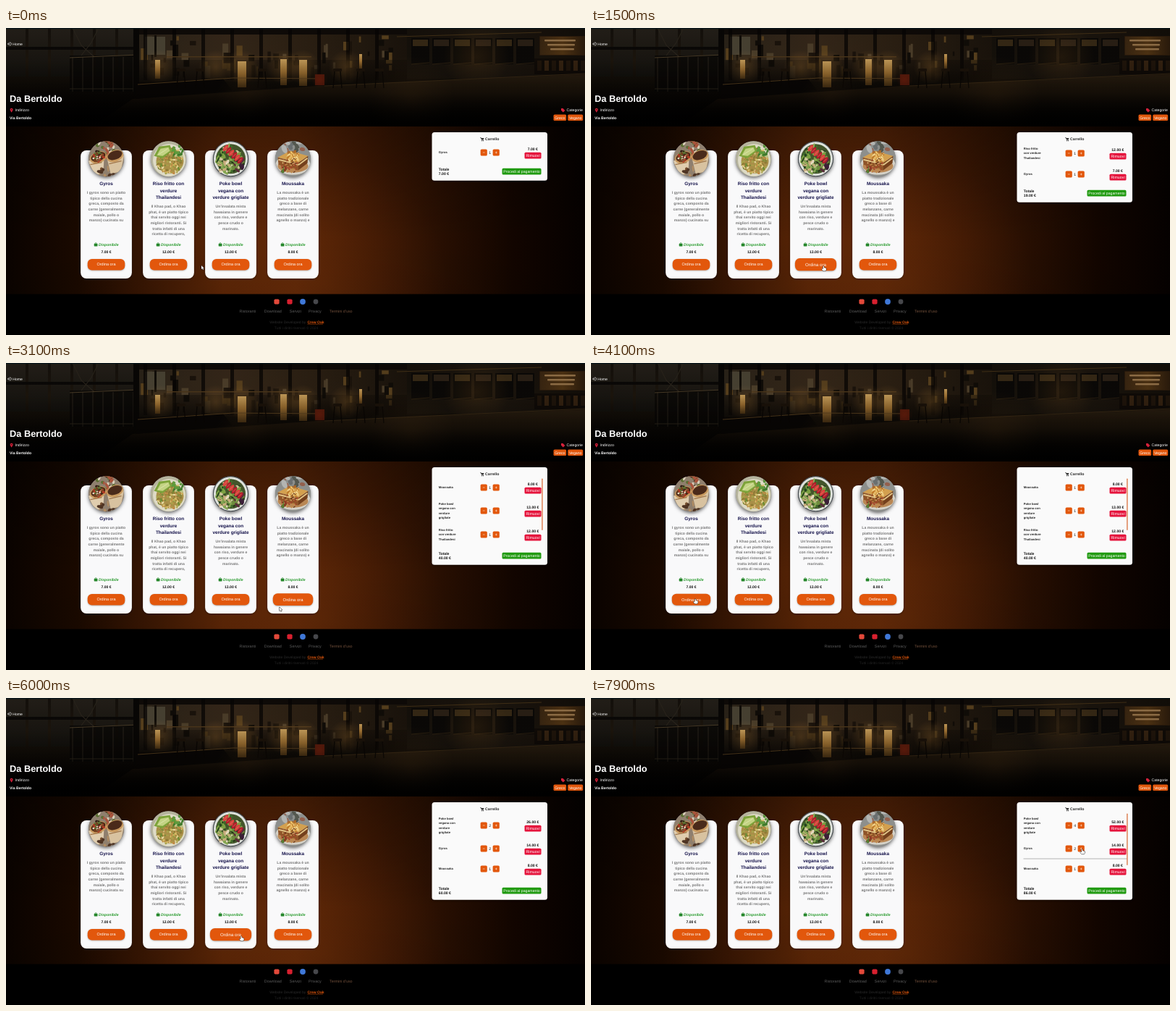
Write an HTML page with a canvas that moves like this. It is 800 px wide and 424 px high and loops after 8000 ms.

```html
<!DOCTYPE html>
<html lang="it">
<head>
<meta charset="utf-8">
<title>Menu</title>
<style>
html, body { margin: 0; width: 100%; height: 100%; overflow: hidden; background: #000; }
canvas { display: block; width: 800px; height: 424px; }
</style>
</head>
<body>
<canvas id="stage"></canvas>
<script>
const W = 800, H = 424, LOOP = 8000;
const ORANGE = '#e2570c', FONT = '"Liberation Sans", Arial, sans-serif';
const dpr = Math.max(1, window.devicePixelRatio || 1);

function setup(canvas) {
  canvas.width = W * dpr;
  canvas.height = H * dpr;
  const c = canvas.getContext('2d');
  c.scale(dpr, dpr);
  c.textBaseline = 'alphabetic';
  c.textRendering = 'geometricPrecision';
  return c;
}
const screen = setup(document.getElementById('stage'));
const page = document.createElement('canvas');
let g = setup(page);

// ---------- helpers ----------
function rect(x, y, w, h, fill, r = 0) {
  g.fillStyle = fill;
  g.beginPath();
  g.roundRect(x, y, w, h, r);
  g.fill();
}
function disc(x, y, r, fill) {
  g.fillStyle = fill;
  g.beginPath();
  g.arc(x, y, r, 0, 7);
  g.fill();
}
function oval(x, y, rx, ry, turn, fill) {
  g.fillStyle = fill;
  g.beginPath();
  g.ellipse(x, y, rx, ry, turn, 0, 7);
  g.fill();
}
function poly(fill, ...p) {
  g.fillStyle = fill;
  g.beginPath();
  for (let i = 0; i < p.length; i += 2) g.lineTo(p[i], p[i + 1]);
  g.fill();
}
function line(color, width, ...p) {
  g.strokeStyle = color;
  g.lineWidth = width;
  g.beginPath();
  for (let i = 0; i < p.length; i += 2) g.lineTo(p[i], p[i + 1]);
  g.stroke();
}
// y is the middle of the capitals
function text(s, x, y, size, color, weight = '', align = 'left') {
  g.font = `${weight} ${size}px ${FONT}`;
  g.textAlign = align;
  g.fillStyle = color;
  g.fillText(s, x, y + size * 0.36);
}
function shade(x0, y0, x1, y1, ...colors) {
  const s = g.createLinearGradient(x0, y0, x1, y1);
  colors.forEach((c, i) => s.addColorStop(i / (colors.length - 1), c));
  return s;
}
function glow(x, y, r, rgb, a) {
  const s = g.createRadialGradient(x, y, 0, x, y, r);
  s.addColorStop(0, `rgba(${rgb},${a})`);
  s.addColorStop(1, `rgba(${rgb},0)`);
  g.fillStyle = s;
  g.fillRect(x - r, y - r, 2 * r, 2 * r);
}
function shadowed(blur, dy, color, draw) {
  g.save();
  g.shadowColor = color;
  g.shadowBlur = blur * dpr;
  g.shadowOffsetY = dy * dpr;
  draw();
  g.restore();
}
function random(seed) {
  return () => (seed = (seed * 16807) % 2147483647) / 2147483647;
}
function bits(seed, n, x, y, spread, size, colors) {
  const rnd = random(seed);
  for (let i = 0; i < n; i++) {
    const a = rnd() * 6.283, d = Math.sqrt(rnd()) * spread;
    oval(x + d * Math.cos(a), y + d * Math.sin(a), size * (0.5 + rnd()),
      size * (0.3 + rnd() * 0.5), rnd() * 3, colors[Math.floor(rnd() * colors.length)]);
  }
}

// ---------- header ----------
function drawBar() {
  g.save();
  g.beginPath();
  g.rect(0, 0, W, 136);
  g.clip();
  rect(0, 0, W, 136, shade(0, 0, 0, 136, '#15110c', '#1d160d', '#0b0805', '#000'));
  // windows and railing on the left
  for (let i = 0; i < 6; i++) rect(i * 31, 1, 27, 66, shade(0, 0, 0, 67, '#26211a', '#13110d'));
  rect(0, 26, 180, 4, '#0b0907');
  rect(88, 38, 92, 50, 'rgba(8,7,5,.7)');
  line('#2c261d', 1.1, 92, 0, 104, 24, 122, 40);
  line('#2c261d', 1.1, 128, 0, 118, 20, 104, 38);
  for (let x = 92; x < 178; x += 14) line('#3a3227', 0.7, x, 88, x, 40);
  line('#4a3c28', 1.2, 88, 41, 182, 37);
  line('#30281c', 1, 88, 84, 182, 84);
  rect(176, 0, 8, 92, '#090705');
  // back wall and shelves
  rect(184, 4, 370, 70, shade(184, 0, 554, 0, '#2c2419', '#38291a', '#2c2013', '#1b140c'));
  const rnd = random(41);
  for (let i = 0; i < 60; i++) {
    rect(186 + rnd() * 350, 10 + rnd() * 46, 2 + rnd() * 8, 5 + rnd() * 14,
      ['#50412c', '#1c140c', '#110d08', '#5c431f'][Math.floor(rnd() * 4)]);
  }
  rect(184, 0, 370, 9, '#0f0b08');
  rect(192, 12, 28, 25, '#4c4535');
  rect(205, 10, 3, 30, '#120e09');
  for (let i = 0; i < 9; i++) rect(190 + i * 40, 0, 5, 72, 'rgba(7,5,3,.75)');
  rect(222, 39, 200, 1.6, '#4d371b');
  rect(184, 44, 370, 30, shade(0, 44, 0, 74, 'rgba(13,9,5,.35)', 'rgba(13,9,5,.8)'));
  for (const x of [212, 290, 326, 384, 410, 470]) glow(x, 54, 24, '215,150,65', 0.24);
  for (const [x, y, w, h] of [[320, 46, 12, 36], [379, 43, 9, 36], [405, 44, 11, 36], [206, 44, 7, 26], [488, 36, 4, 20]]) {
    rect(x, y, w, h, shade(0, y, 0, y + h, '#c9a05c', '#a37433', '#4e3515'));
  }
  // right cabinets
  rect(554, 0, 246, 70, shade(554, 0, 800, 0, '#16110b', '#1d160e', '#130e09'));
  for (let i = 0; i < 6; i++) {
    rect(560 + i * 29, 14, 25, 36, '#0b0907');
    rect(562 + i * 29, 16, 21, 9, i % 2 ? '#2c2116' : '#382a16');
    line('#3c2b16', 0.7, 560 + i * 29, 50, 585 + i * 29, 48);
  }
  line('#503a1b', 0.8, 540, 12, 740, 6);
  glow(650, 40, 46, '190,125,45', 0.14);
  // lit board
  rect(737, 11, 63, 27, '#2b1b0c', 1);
  rect(738, 12, 61, 25, shade(738, 0, 800, 0, '#3b2712', '#523514', '#2c1c0c'));
  for (let i = 0; i < 3; i++) rect(744 + i * 4, 16 + i * 6, 43 - i * 5, 2.6, '#98754a', 1);
  rect(730, 42, 70, 22, '#100b07');
  for (let i = 0; i < 7; i++) rect(734 + i * 10, 45, 6, 14, i % 2 ? '#362311' : '#20150b');
  // counters
  poly(shade(0, 66, 0, 136, '#2a1e10', '#1e150b', '#0c0804', '#000'),
    175, 98, 430, 80, 800, 64, 800, 136, 120, 136);
  poly('#0a0705', 180, 76, 300, 70, 312, 86, 180, 98);
  line('#664a24', 0.9, 182, 78, 314, 69, 440, 70);
  line('#46331a', 0.8, 440, 80, 800, 63);
  rect(427, 64, 13, 15, '#5c1c0c');
  glow(433, 72, 11, '190,50,20', 0.22);
  for (const x of [236, 262, 348, 452, 484, 510]) {
    rect(x, 56, 12, 4, '#1c130a', 1);
    line('#0b0704', 1.3, x + 2, 60, x, 83);
    line('#0b0704', 1.3, x + 10, 60, x + 12, 83);
  }
  glow(560, 98, 60, '130,86,36', 0.17);
  glow(330, 96, 40, '130,86,36', 0.12);
  rect(0, 0, W, 136, shade(0, 0, 0, 136, 'rgba(0,0,0,.1)', 'rgba(0,0,0,.08)', 'rgba(0,0,0,.35)', 'rgba(0,0,0,.96)'));
  rect(0, 0, W, 1.2, '#07141a');
  g.restore();
}

function drawHeader() {
  drawBar();
  g.strokeStyle = '#ddd';
  g.lineWidth = 0.7;
  g.beginPath();
  g.arc(5.6, 22, 2, -2.2, 2.2);
  g.stroke();
  line('#ddd', 0.7, 2.4, 22, 6, 22);
  line('#ddd', 0.7, 4, 20.6, 2.4, 22, 4, 23.4);
  text('Home', 9.2, 22, 5.12, '#fff');
  text('Da Bertoldo', 5, 97, 12.8, '#fff', 'bold');
  disc(7.6, 112.8, 2, '#d4213a');
  poly('#d4213a', 5.9, 113.8, 9.3, 113.8, 7.6, 116.8);
  disc(7.6, 112.7, 0.7, '#200');
  text('Indirizzo', 12.5, 113.5, 5.2, '#fff');
  text('Via Bertoldo', 5, 123.7, 5.12, '#fff', 'bold');
  poly('#d4213a', 767, 111, 769.6, 111, 772.4, 114, 769.8, 116.6, 767, 113.8);
  text('Categorie', 797, 113.5, 5.2, '#fff', '', 'right');
  rect(756.5, 119.5, 17.7, 8.6, ORANGE, 1.6);
  text('Greco', 765.4, 123.8, 5.2, '#fff', '', 'center');
  rect(776.2, 119.5, 21, 8.6, ORANGE, 1.6);
  text('Vegano', 786.7, 123.8, 5.2, '#fff', '', 'center');
}

// ---------- dishes ----------
const foods = [
  (x, y) => {
    disc(x, y, 25, '#8f7f6e');
    bits(3, 30, x, y - 16, 16, 3.5, ['#5d6f34', '#a9543c', '#d8cdb8', '#46341f']);
    poly('#e0cdae', x - 25, y + 3, x - 3, y - 2, x - 4, y + 18, x - 15, y + 24);
    poly('#d8c2a0', x + 1, y - 1, x + 25, y - 6, x + 20, y + 18, x + 6, y + 20);
    for (const [dx, dy] of [[-11, -2], [12, -4]]) {
      oval(x + dx, y + dy, 12, 8, -0.35, '#c99a5f');
      oval(x + dx, y + dy - 1, 10.5, 6, -0.35, '#4a2a1a');
      bits(9 - dx, 40, x + dx, y + dy - 1, 8, 2.2, ['#5d7a35', '#b23a25', '#efe2c8', '#73401f', '#2e1a12']);
    }
    line('#a0764a', 1.2, x - 22, y + 8, x - 6, y + 5);
    line('#a0764a', 1.2, x + 4, y + 7, x + 21, y + 3);
    bits(6, 14, x, y + 22, 12, 3, ['#4f3423', '#7a5232', '#b08c62']);
  },
  (x, y) => {
    disc(x, y, 25, '#b5b39c');
    disc(x + 1, y + 2, 22.5, '#dedbc6');
    oval(x + 2, y + 3, 19, 17, 0, '#a98f48');
    bits(17, 170, x + 2, y + 3, 18, 2, ['#d7bd69', '#a9a24b', '#e6d9a0', '#6f8b36', '#c08a45', '#8f7a35']);
    poly('#7da33a', x - 20, y - 4, x - 13, y - 17, x + 2, y - 19, x + 5, y - 11, x - 8, y - 1);
    poly('#c3d383', x - 16, y - 5, x - 11, y - 14, x, y - 16, x + 2, y - 11, x - 8, y - 4);
    line('#e6ebbb', 0.7, x - 14, y - 6, x - 1, y - 14);
    bits(5, 16, x + 13, y - 11, 8, 3, ['#3f7a2c', '#5d9a3b', '#bcc486']);
  },
  (x, y) => {
    disc(x, y, 25, '#3b4248');
    disc(x, y, 23.5, '#dfe2dc');
    disc(x, y, 20.5, '#43552b');
    bits(29, 90, x - 2, y, 18, 3, ['#3e6b2a', '#7ca143', '#24401d', '#8fae57', '#cfc49a']);
    bits(13, 24, x - 8, y + 11, 9, 2.8, ['#e8dcc0', '#c7ac7c', '#85a552']);
    bits(7, 26, x + 9, y + 8, 9, 3, ['#3a1f37', '#5a2a3a', '#243818', '#6e8d3e']);
    for (let i = 0; i < 6; i++) {
      const dx = -7 + i * 4, dy = -15 + i * 3.4;
      oval(x + dx, y + dy, 5.4, 2.5, -0.9, i % 2 ? '#b51c2a' : '#d9403a');
      line('#e98a78', 0.6, x + dx - 2, y + dy + 2, x + dx + 2, y + dy - 2);
    }
  },
  (x, y) => {
    disc(x, y, 25, '#8d8f8c');
    bits(31, 16, x, y - 17, 17, 5, ['#6a6f70', '#94604d', '#b3b5b2', '#54584f']);
    oval(x, y + 8, 24, 14, 0, '#d5d2c8');
    oval(x, y + 10, 21, 9, 0, '#b98754');
    poly('#d3a04f', x - 21, y - 2, x - 4, y - 11, x + 21, y - 4, x + 8, y + 5);
    poly('#8f5428', x - 21, y - 2, x + 8, y + 5, x + 7, y + 16, x - 20, y + 8);
    poly('#74401d', x + 8, y + 5, x + 21, y - 4, x + 20, y + 6, x + 7, y + 16);
    line('#e0c286', 2, x - 20, y + 1, x + 8, y + 8, x + 20, y - 1);
    bits(23, 60, x, y - 3, 9, 1.7, ['#eec46a', '#c17c2a', '#a9672a', '#f0d48c']);
    bits(11, 40, x - 4, y + 9, 11, 1.5, ['#c28a4a', '#6b381b', '#a5452a', '#d9b273']);
    bits(19, 10, x - 14, y + 15, 5, 2, ['#4f7a2c', '#8b3a24']);
  }
];

const dishes = {
  gyros: { price: 7, title: ['Gyros'], row: ['Gyros'],
    about: ['I gyros sono un piatto', 'tipico della cucina', 'greca, composto da', 'carne (generalmente', 'maiale, pollo o', 'manzo) cucinata su'] },
  riso: { price: 12, title: ['Riso fritto con', 'verdure', 'Thailandesi'], row: ['Riso fritto', 'con verdure', 'Thailandesi'],
    about: ['Il Khao pad, o Khao', 'phat, è un piatto tipico', 'thai servito oggi nei', 'migliori ristoranti. Si', 'tratta infatti di una', 'ricetta di recupero,'] },
  poke: { price: 13, title: ['Poke bowl', 'vegana con', 'verdure grigliate'], row: ['Poke bowl', 'vegana con', 'verdure', 'grigliate'],
    about: ["Un'insalata mista", 'hawaiana in genere', 'con riso, verdure e', 'pesce crudo o', 'marinato.'] },
  moussaka: { price: 8, title: ['Moussaka'], row: ['Moussaka'],
    about: ['La moussaka è un', 'piatto tradizionale', 'greco a base di', 'melanzane, carne', 'macinata (di solito', 'agnello o manzo) e'] }
};
const cardX = i => 138.5 + i * 86;
const euro = n => n.toFixed(2) + ' €';

function drawCard(dish, i) {
  const x = cardX(i);
  shadowed(3, 1, 'rgba(0,0,0,.4)', () => rect(x - 35.4, 169, 70.8, 177, '#f9f9fa', 8));
  shadowed(5, 2, 'rgba(0,0,0,.6)', () => disc(x, 180.7, 24.5, '#888'));
  g.save();
  g.beginPath();
  g.arc(x, 180.7, 24.5, 0, 7);
  g.clip();
  foods[i](x, 180.7);
  g.restore();
  dish.title.forEach((s, k) => text(s, x, 215 + k * 9.4, 6.4, '#14124a', 'bold', 'center'));
  const top = 227 + (dish.title.length - 1) * 9.5;
  dish.about.forEach((s, k) => text(s, x, top + k * 7.7, 5.12, '#777', 'bold', 'center'));
  rect(x - 16.8, 297.8, 4.8, 3.6, '#24862a', 0.6);
  g.strokeStyle = '#24862a';
  g.lineWidth = 0.6;
  g.beginPath();
  g.arc(x - 14.4, 297.8, 1.2, 3.14, 6.28);
  g.stroke();
  text('Disponibile', x - 10.4, 299.2, 5.12, '#279a2c', 'italic bold');
  text(euro(dish.price), x, 309.6, 5.12, '#111', 'bold', 'center');
}

function drawFooter() {
  rect(0, 367.5, W, 56.5, '#000');
  rect(370.4, 374.4, 7.2, 7.2, '#e2493a', 1.8);
  rect(388.4, 374.4, 7.2, 7.2, '#d8202f', 1.8);
  disc(410, 378, 3.9, '#3f78d8');
  disc(428, 378, 3.4, '#46474b');
  [['Ristoranti', 322.5], ['Download', 356.8], ['Servizi', 391.8], ['Privacy', 418], ["Termini d'uso", 447]].forEach(
    ([s, x], i) => text(s, x, 391, 5.4, i < 4 ? '#5c5c5c' : '#74513c'));
  text('Website Developed by', 364.3, 406.2, 5, '#2b2b2b');
  text('Crew Oak', 416.5, 406.2, 5, ORANGE, 'bold');
  rect(416.5, 408.8, 21.6, 0.5, ORANGE);
  text('Tutti i diritti riservati © 2024', 401, 414, 5, '#232323', '', 'center');
}

function drawPage() {
  rect(0, 0, W, H, '#000');
  rect(0, 136, W, 232, shade(0, 0, W, 0, '#0a0300', '#1a0900', '#3a1703', '#5a2506', '#5c2607', '#431a04', '#280f02', '#120500', '#050100'));
  rect(0, 136, W, 232, shade(0, 136, 0, 368, 'rgba(0,0,0,.32)', 'rgba(0,0,0,.15)', 'rgba(0,0,0,0)', 'rgba(0,0,0,.05)'));
  glow(440, 350, 170, '150,68,14', 0.12);
  drawHeader();
  Object.values(dishes).forEach(drawCard);
  drawFooter();
}

// ---------- cart ----------
const orders = [[0, 'gyros'], [300, 'riso'], [1600, 'poke'], [2600, 'moussaka'], [4500, 'gyros'], [5600, 'poke'], [6900, 'poke'], [7300, 'poke']];
function cartAt(t) {
  let rows = [];
  for (const [at, id] of orders) {
    if (at > t) break;
    const old = rows.find(r => r.id === id);
    rows = [{ id, n: old ? old.n + 1 : 1 }, ...rows.filter(r => r !== old)];
  }
  return rows;
}
const rowHeight = id => ({ 1: 28, 3: 30, 4: 36 })[dishes[id].row.length];

function drawRow({ id, n }, y) {
  const names = dishes[id].row;
  names.forEach((s, k) => text(s, 597.8, y + (k - (names.length - 1) / 2) * 6.1, 4.16, '#222', 'bold'));
  for (const x of [660.2, 677.2]) {
    rect(x - 4.6, y - 4.6, 9.2, 9.2, ORANGE, 1.7);
    rect(x - 1.4, y - 0.25, 2.8, 0.5, '#fff');
  }
  rect(676.95, y - 1.4, 0.5, 2.8, '#fff');
  text(n, 668.7, y, 5.12, '#111', '', 'center');
  text(euro(n * dishes[id].price), 727.8, y - 4.6, 5.12, '#111', 'bold', 'center');
  rect(716.5, y - 0.3, 23, 8.8, '#e5143c', 1.6);
  text('Rimuovi', 728, y + 4.1, 5.3, '#fff', '', 'center');
}

function drawCart(t, mouse) {
  const rows = cartAt(t);
  const full = rows.reduce((h, r) => h + rowHeight(r.id), 0);
  const end = 158 + Math.min(full, 96);
  shadowed(3, 1, 'rgba(0,0,0,.4)', () => rect(588.5, 144, 159.5, end - 119.2, '#fafafa', 3.5));
  line('#222', 0.7, 655.2, 151.5, 656.3, 151.5, 657.3, 154.4, 659.8, 154.4);
  poly('#222', 656.6, 152, 660.4, 152, 659.8, 153.8, 657.1, 153.8);
  disc(657.6, 155.7, 0.6, '#222');
  disc(659.5, 155.7, 0.6, '#222');
  text('Carrello', 662, 153.5, 5.12, '#222', 'bold');
  g.save();
  g.beginPath();
  g.rect(589, 158, 158, end - 158);
  g.clip();
  let y = 158;
  for (const r of rows) {
    const h = rowHeight(r.id);
    drawRow(r, y + h / 2);
    y += h;
    if (mouse.x > 597 && mouse.x < 741 && mouse.y > y - h && mouse.y < y) rect(597.5, y - 0.4, 143.5, 0.8, '#b5b5b5');
  }
  g.restore();
  if (full > 96 && (t < 5600 || t > 6400)) rect(740.2, 159.5, 1.4, 71.5, '#dc7a4a', 0.7);
  text('Totale', 597.8, end + 8.8, 5.12, '#111', 'bold');
  text(euro(rows.reduce((s, r) => s + r.n * dishes[r.id].price, 0)), 597.8, end + 15.2, 5.12, '#111', 'bold');
  rect(685.5, end + 7.8, 54, 8.8, '#209a10', 1.6);
  text('Procedi al pagamento', 712.5, end + 12.2, 5.2, '#fff', '', 'center');
}

// ---------- pointer ----------
const path = [[0, 270, 328], [800, 268, 330.5], [1100, 318, 329], [1650, 322, 329], [1950, 407, 328], [2300, 409, 328], [2800, 409, 329],
  [3500, 330, 350], [4000, 175, 338], [4100, 144, 326], [4600, 145, 326], [4900, 245, 328], [5050, 248, 329], [5350, 324, 329],
  [6050, 325, 329], [6500, 676, 175], [7450, 677, 176], [7750, 678.5, 209], [8000, 678.5, 209]];
function mouseAt(t) {
  const i = Math.max(1, path.findIndex(p => p[0] >= t));
  const [a, b] = [path[i - 1], path[i]];
  const u = Math.max(0, (t - a[0]) / (b[0] - a[0])), e = u * u * (3 - 2 * u);
  return { x: a[1] + (b[1] - a[1]) * e, y: a[2] + (b[2] - a[2]) * e };
}
const overButton = (m, i) => Math.abs(m.x - cardX(i)) < 26 && m.y > 319 && m.y < 334.5;
// share of the last 200 ms spent over the button
function growth(t, i) {
  let hits = 0;
  for (let k = 0; k < 8; k++) hits += overButton(mouseAt(Math.max(0, t - k * 25)), i);
  const u = hits / 8;
  return u * u * (3 - 2 * u);
}
function drawButton(i, t) {
  const s = 1 + 0.11 * growth(t, i);
  g.save();
  g.translate(cardX(i), 326.7);
  g.scale(s, s);
  shadowed(2, 0.8, 'rgba(0,0,0,.3)', () => rect(-25.8, -7.8, 51.6, 15.6, ORANGE, 6));
  text('Ordina ora', 0, -0.2, 5.5, '#fff', '', 'center');
  g.restore();
}
function drawPointer(m, hand) {
  g.save();
  g.translate(m.x, m.y);
  g.beginPath();
  const shape = hand
    ? [-0.6, 0, 0.6, 0, 0.7, 2, 3.6, 2.7, 3.7, 4.8, 2.8, 6.6, -0.6, 6.6, -2.6, 4, -1.9, 3.3, -0.7, 4.2]
    : [0, 0, 0, 5.2, 1.2, 4.1, 2.1, 6, 3, 5.6, 2.1, 3.8, 3.7, 3.7];
  for (let i = 0; i < shape.length; i += 2) g.lineTo(shape[i], shape[i + 1]);
  g.closePath();
  g.lineWidth = 0.9;
  g.lineJoin = 'round';
  g.strokeStyle = '#111';
  g.stroke();
  g.fillStyle = '#fff';
  g.fill();
  g.restore();
}

drawPage();
g = screen;
const start = performance.now();
function frame(now) {
  const t = Math.floor((Math.max(0, now - start) % LOOP) / 100) * 100;
  const mouse = mouseAt(t);
  g.drawImage(page, 0, 0, W, H);
  for (let i = 0; i < 4; i++) drawButton(i, t);
  drawCart(t, mouse);
  drawPointer(mouse, t > 6400 || [0, 1, 2, 3].some(i => overButton(mouse, i)));
  requestAnimationFrame(frame);
}
frame(start);
</script>
</body>
</html>
```
